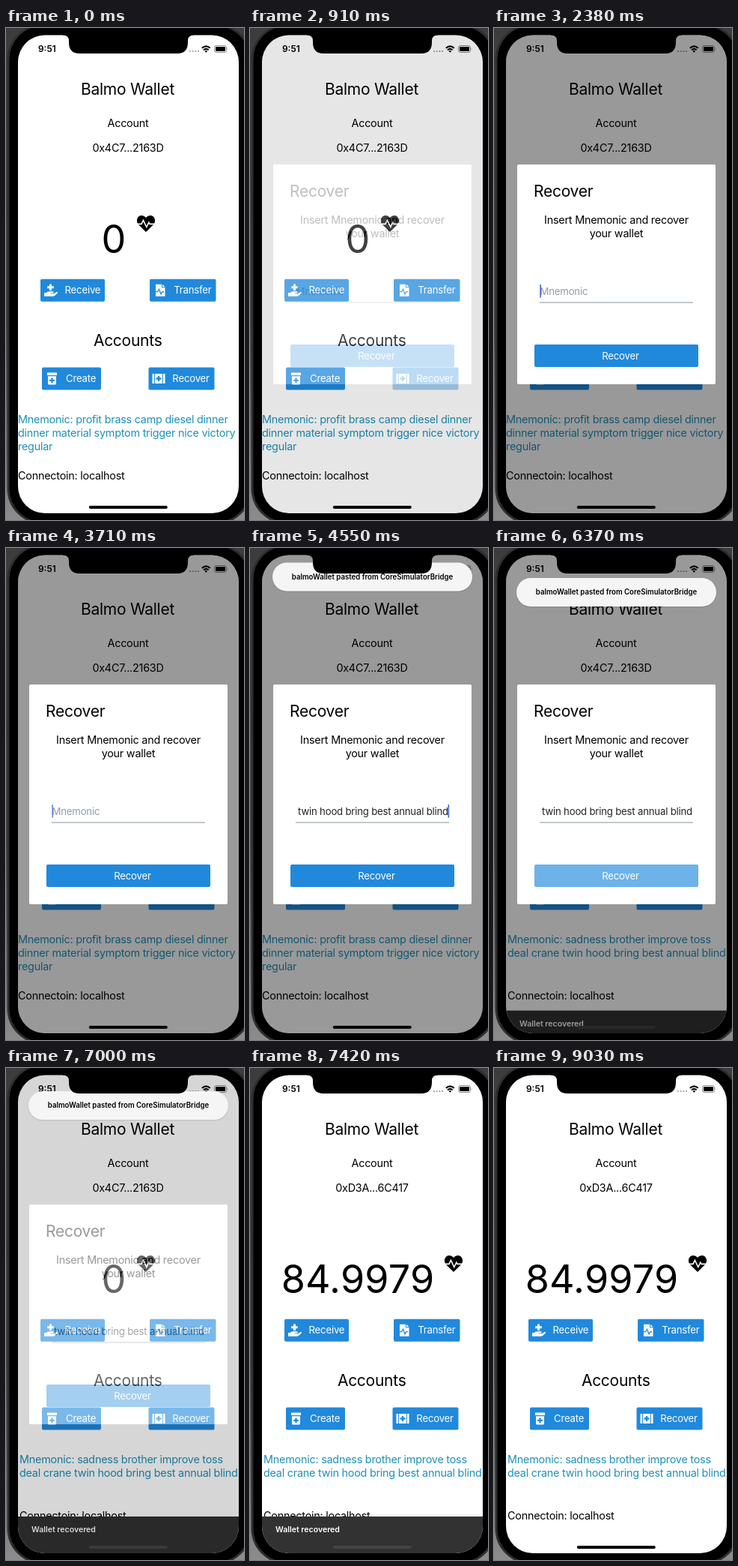
These frames come from a looping animation (318 by 656 pixels, 9.17 s). An HTML page:

```html
<!DOCTYPE html>
<html lang="en">
<head>
<meta charset="utf-8">
<title>Wallet recovery</title>
<style>
  html, body { margin: 0; width: 100%; height: 100%; overflow: hidden; background: #000; }
  svg { display: block; width: 318px; height: 656px; }
  text { font-family: Inter, Roboto, "Liberation Sans", sans-serif; white-space: pre; }
  .title { font-size: 21px; letter-spacing: -.26px; }
  .body { font-size: 14.4px; letter-spacing: -.24px; }
  .label { font-size: 13.2px; letter-spacing: -.2px; }
  .amount { font-size: 52px; letter-spacing: .2px; }
  .note { font-size: 9.65px; font-weight: 600; }
  .mid { text-anchor: middle; }
  .white { fill: #fff; }
  .blue { fill: #2089dc; }
</style>
</head>
<body>
<svg viewBox="0 0 318 656">
  <defs>
    <linearGradient id="desk" x2="0" y2="1">
      <stop offset="0" stop-color="#3c3c3c"/>
      <stop offset=".6" stop-color="#4a4a4a"/>
      <stop offset="1" stop-color="#8c8c8c"/>
    </linearGradient>
    <clipPath id="screen"><rect x="16" y="9.5" width="295" height="637.5" rx="36"/></clipPath>
  </defs>

  <rect width="318" height="656" fill="url(#desk)"/>
  <rect x="3" y="-4" width="324" height="664" rx="46" stroke="#2e2e2e" stroke-width="3"/>

  <g clip-path="url(#screen)">
    <rect width="318" height="656" class="white"/>

    <g id="status">
      <text x="43" y="32" font-size="11.9" font-weight="600">9:51</text>
      <g fill="#999">
        <circle cx="246" cy="31" r="1.1"/><circle cx="249.7" cy="31" r="1.1"/>
        <circle cx="253.4" cy="31" r="1.1"/><circle cx="257" cy="31" r="1.1"/>
      </g>
      <g fill="none" stroke="#000" stroke-width="2">
        <path d="M261.8 26.8Q267.3 22 272.8 26.8M263.9 29.3Q267.3 26.4 270.7 29.3"/>
      </g>
      <path d="M265.4 30.7Q267.3 29.2 269.2 30.7L267.3 32.8Z"/>
      <rect x="278.5" y="23.5" width="16" height="9" rx="2.6" fill="none" stroke="#888"/>
      <rect x="280" y="25" width="13" height="6" rx="1.3"/>
      <path d="M295.8 26.5q1.6 1.5 0 3z" fill="#888"/>
    </g>

    <text x="162.5" y="89" class="title mid">Balmo Wallet</text>
    <text x="163" y="132" class="body mid">Account</text>
    <text id="address" x="163" y="165" class="body mid"></text>
    <text id="balance" x="144" y="299.5" class="amount mid"></text>
    <g id="heart">
      <path d="M0 22L-10.6 11.4C-14 6.5 -11 0 -6 0C-3 0 -1 1.5 0 3C1 1.5 3 0 6 0C11 0 14 6.5 10.6 11.4Z"/>
      <path d="M-13 11.4H-6L-3.6 6.4L.8 15.5L3.8 9.2L5 11.4H13" fill="none" stroke="#fff" stroke-width="1.6"/>
    </g>

    <g id="buttons"></g>
    <text x="162.7" y="424" class="title mid">Accounts</text>

    <g id="phrase" class="body" fill="#1e90b8">
      <text y="527"></text><text y="545"></text><text y="563"></text>
    </g>
    <text id="host" y="602" class="body">Connectoin: localhost</text>

    <g id="snack">
      <rect x="16" y="598" width="296" height="52" fill="#323232"/>
      <text x="34" y="619" class="white" font-size="10.55" font-weight="600">Wallet recovered</text>
    </g>
    <rect id="home" x="110.8" y="637" width="105" height="4" rx="2"/>

    <g id="modal">
      <rect width="318" height="656" opacity=".4"/>
      <rect x="31" y="182" width="265" height="293" rx="2" class="white"/>
      <text x="53" y="225" class="title">Recover</text>
      <text x="163.5" y="261" class="body mid">Insert Mnemonic and recover</text>
      <text x="163.5" y="279" class="body mid">your wallet</text>
      <text id="field" y="355.5" class="label"></text>
      <rect x="61" y="365.5" width="205" height="1" fill="#86939e"/>
      <rect id="caret" y="342" width="1.6" height="17.5" fill="#3f66c8"/>
      <g id="submit">
        <rect x="54" y="422" width="219" height="30" rx="2" class="blue"/>
        <text x="169" y="442" class="label mid white">Recover</text>
      </g>
    </g>

    <g id="banner">
      <rect x="29.5" y="41" width="268" height="38.5" rx="19" opacity=".08"/>
      <rect x="30" y="40" width="267" height="38" rx="19" fill="#f5f5f5"/>
      <text x="163.5" y="62" class="note mid">balmoWallet pasted from CoreSimulatorBridge</text>
    </g>
  </g>

  <path d="M76 8V9.5Q84 9.5 84 17V19Q84 34 98 34H229Q243 34 243 19V17Q243 9.5 251 9.5V8Z"/>
</svg>

<script>
const LOOP = 9170, STEP = 70;
const $ = id => document.getElementById(id);
const clamp = x => Math.min(1, Math.max(0, x));
const ramp = (t, from, to) => clamp((t - from) / (to - from));
const easeOut = x => 1 - (1 - x) ** 2;
const moveY = (el, y) => el.setAttribute('transform', `translate(0 ${y.toFixed(2)})`);
const show = (el, opacity) => el.setAttribute('opacity', opacity.toFixed(3));
const setText = (el, text) => { if (el.textContent !== text) el.textContent = text; };

// Icons are centred on the origin; blue parts look cut out of the white ones.
const plus = (x, y, r, w) =>
  `M${x - w} ${y - r}h${2 * w}v${r - w}h${r - w}v${2 * w}h${w - r}v${r - w}h${-2 * w}v${w - r}h${w - r}v${-2 * w}h${r - w}z`;
const icons = {
  hand: `<path d="${plus(-.5, -4, 4.2, 1.5)}M-9 3.2h2.5Q-4 1 -1.5 1.6H3Q4.5 2.6 3 3.8H-.5V4.6H4L7.4 2.2Q9.2 1.8 9 3.6L5 7.2Q4 8 2.5 8H-9Z"/>`,
  file: `<path d="M-6 -8H2V-3.5H6.5V8H-6ZM3 -8L6.5 -4.5H3Z"/>
    <path d="M-8 2H-3.5L-1.5 -1.5L1 5L2.8 2H5" fill="none" stroke="#2089dc" stroke-width="1.3"/>`,
  bottle: `<path d="M-6.5 -8h13v3.6h-13zM-5.5 -3.2h11V6.5Q5.5 8 4 8H-4Q-5.5 8 -5.5 6.5Z"/>
    <path class="blue" d="${plus(0, 2.4, 3.3, 1.1)}"/>`,
  kit: `<path d="M-8.5 -6.5h2.6v13h-2.6zM5.9 -6.5h2.6v13h-2.6zM-4.9 -6.5h9.8v13h-9.8z"/>
    <path class="blue" d="${plus(0, 0, 3.4, 1.2)}"/>`
};
const button = (id, x, y, width, icon, iconX, label, labelX) => `
  <g id="${id}">
    <rect x="${x}" y="${y}" width="${width}" height="30" rx="2" class="blue"/>
    <g class="white" transform="translate(${iconX} ${y + 15})">${icons[icon]}</g>
    <text x="${labelX}" y="${y + 19.7}" class="label white">${label}</text>
  </g>`;
$('buttons').innerHTML =
  button('receive', 46, 334.7, 86, 'hand', 60, 'Receive', 78.5) +
  button('transfer', 192, 334.7, 88.5, 'file', 206, 'Transfer', 224.2) +
  button('create', 48, 452.5, 79, 'bottle', 61.5, 'Create', 80) +
  button('recover', 190.5, 452.5, 88, 'kit', 204, 'Recover', 222.3);

const phrases = {
  old: ['Mnemonic: profit brass camp diesel dinner', 'dinner material symptom trigger nice victory', 'regular'],
  recovered: ['Mnemonic: sadness brother improve toss', 'deal crane twin hood bring best annual blind', '']
};

const tap = (t, down) => 1 - .7 * ramp(t, down, down + 140) + .7 * ramp(t, down + 175, down + 455);

function caretOpacity(t, pasted) {
  if (t < 2380 || t >= 6090) return 0;
  if (t < 2660) return 1;
  const phase = (t - (pasted ? 4390 : 2310)) % 1000;
  return ramp(phase, 0, 140) - ramp(phase, 350, 560);
}

function render(t) {
  const pasted = t >= 4340, recovered = t >= 6230, loaded = t >= 7420;

  setText($('address'), loaded ? '0xD3A...6C417' : '0x4C7...2163D');
  setText($('balance'), loaded ? '84.9979' : '0');
  $('heart').setAttribute('transform', `translate(${loaded ? 272 : 187} 250)`);

  const left = recovered ? 18 : 16;
  const lines = recovered ? phrases.recovered : phrases.old;
  [...$('phrase').children].forEach((line, i) => {
    line.setAttribute('x', left);
    setText(line, lines[i]);
  });
  $('host').setAttribute('x', left);

  const snackIn = easeOut(ramp(t, 6230, 6580)) * (1 - ramp(t, 8050, 8330) ** 2);
  moveY($('snack'), 52 * (1 - snackIn));
  $('home').setAttribute('fill', snackIn > .3 ? '#444' : '#000');

  show($('recover'), tap(t, 700));
  show($('modal'), ramp(t, 840, 1120) - ramp(t, 6790, 7140));
  show($('submit'), tap(t, 6055));

  const field = $('field');
  setText(field, pasted ? 'twin hood bring best annual blind' : 'Mnemonic');
  field.setAttribute('x', pasted ? 265 : 61.5);
  field.setAttribute('text-anchor', pasted ? 'end' : 'start');
  field.setAttribute('fill', pasted ? '#222' : '#929ca5');
  $('caret').setAttribute('x', pasted ? 264.5 : 61.3);
  show($('caret'), caretOpacity(t, pasted));

  const bannerIn = t < 4340 ? 0 : 1 - Math.exp((4340 - t) / 154);
  moveY($('banner'), -80 * (1 - bannerIn) - 80 * ramp(t, 6860, 7280) ** 2);
}

const start = performance.now();
function tick() {
  const t = (performance.now() - start) % LOOP;
  render(Math.floor(t / STEP) * STEP);
  requestAnimationFrame(tick);
}
tick();
</script>
</body>
</html>
```
